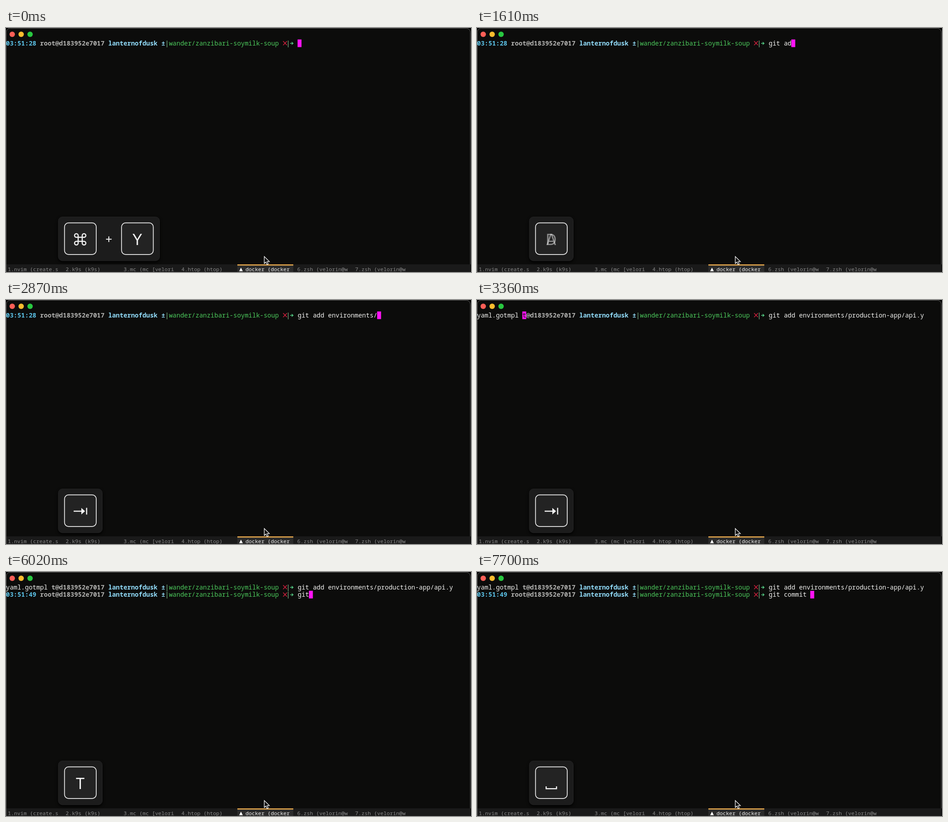
Animation, 1031 px wide and 543 px high, one loop 8000 ms. Source, as an HTML page:

```html
<!DOCTYPE html>
<html lang="en">
<head>
<meta charset="utf-8">
<title>Terminal session</title>
<style>
html, body { margin: 0; width: 100%; height: 100%; overflow: hidden; background: #0c0c0b; }
svg { display: block; width: 100vw; height: 100vh; }
text { white-space: pre; }
.mono { font: 14px "Noto Sans Mono", monospace; }
.tab { font: 11.667px "Noto Sans Mono", monospace; fill: #8b8b8b; }
.key { font: 33.5px Inter, sans-serif; fill: #f1f1f1; text-anchor: middle; }
.line { fill: none; stroke: #f1f1f1; stroke-width: 2.5; }
.panel { filter: drop-shadow(0 3px 3px #000); }
.b { font-weight: 700; }
</style>
</head>
<body>
<svg id="stage" viewBox="0 0 1031 543" preserveAspectRatio="none"></svg>
<script>
const NS = 'http://www.w3.org/2000/svg';
const stage = document.getElementById('stage');
const LOOP = 8000, STEP = 70, CELL = 8.4, INPUT = 77;

function add(parent, tag, attrs, text) {
  const el = document.createElementNS(NS, tag);
  for (const k in attrs) el.setAttribute(k, attrs[k]);
  if (text) el.textContent = text;
  parent.appendChild(el);
  return el;
}
const group = (parent, attrs) => add(parent, 'g', attrs || {});
const rect = (parent, x, y, width, height, fill, more) =>
  add(parent, 'rect', { x, y, width, height, fill, ...more });
const path = (parent, d, attrs) => add(parent, 'path', { d, ...attrs });
const rowY = row => 38.6 + row * 16.4;
const write = (parent, col, row, text, fill, bold) =>
  add(parent, 'text', { x: col * CELL, y: rowY(row), fill, class: bold ? 'mono b' : 'mono' }, text);
const show = (el, on) => el.setAttribute('opacity', +on);

// Terminal
rect(stage, 0, 0, 1031, 543, '#000');
rect(stage, 0.5, 0.5, 1029, 560, '#0c0c0b', { rx: 9, stroke: '#5c5c5b' });
['#ff5f57', '#febc2e', '#28c840'].forEach((fill, i) =>
  add(stage, 'circle', { cx: 13.8 + i * 19.8, cy: 14, r: 6, fill }));

function prompt(row, time) {
  const g = group(stage), y = row * 16.4;
  write(g, 0, row, time, '#5cc3e8', true);
  write(g, 9, row, 'root@d183952e7017', '#b2b2b0', true);
  write(g, 27, row, 'lanternofdusk', '#92dcfa', true);
  write(g, 41, row, '±', '#92dcfa', true);
  write(g, 42, row, '|', '#8fd6a0');
  write(g, 43, row, 'wander/zanzibari-soymilk-soup', '#4cc95c');
  path(g, `M614.4 ${29.3 + y}l8.6 9m0 -9l-8.6 9`, { stroke: '#d3213f', 'stroke-width': 1.5 });
  write(g, 74, row, '|', '#8fd6a0');
  path(g, `M630 ${34.2 + y}h6m-2.6 -2.9l3.2 2.9l-3.2 2.9`,
    { fill: 'none', stroke: '#55cf85', 'stroke-width': 1.4 });
  return g;
}
prompt(0, '03:51:28');
const wrap = group(stage);
rect(wrap, 1, 25, 12 * CELL - 1, 18, '#0c0c0b');
write(wrap, 0, 0, 'yaml.gotmpl', '#f2f2f0');
const second = prompt(1, '03:51:49');
const inputs = [0, 1].map(row => write(stage, INPUT, row, '', '#f2f2f0'));
const cursor = rect(stage, 0, 0, 8.7, 17, '#ff13f5');
const under = write(stage, 12, 0, 't', '#0c0c0b');

// Tab bar
rect(stage, 1, 526, 1029, 17, '#1a1a1a');
rect(stage, 513, 526, 124, 17, '#2b2b2b');
rect(stage, 513, 526, 124, 2.6, '#e5a74c');
['1.nvim (create.s', '2.k9s (k9s)', '3.mc (mc [velori', '4.htop (htop)', '',
  '6.zsh (velorin@w', '7.zsh (velorin@w'].forEach((name, i) =>
  add(stage, 'text', { x: 4 + i * 128.35, y: 541.3, class: 'tab' }, name));
path(stage, 'M517 541.2l4 -8l4 8z', { fill: '#fff' });
add(stage, 'text', { x: 531, y: 541.3, class: 'tab', style: 'fill:#f4f4f4' }, 'docker (docker');

// Key caps
function panel(width) {
  const g = group(stage);
  rect(g, 116, 420.5, width, 97.5, '#1c1c1c', { rx: 9, class: 'panel', stroke: '#252525' });
  return g;
}
const cap = (g, x) => rect(g, x, 433.7, 70.4, 70.4, '#232323',
  { rx: 9, stroke: '#ededed', 'stroke-width': 1.7 });

const combo = panel(224.5);
cap(combo, 129.7);
cap(combo, 256.2);
path(combo, 'M-4.5 -8.5a4 4 0 1 0 -4 4h17a4 4 0 1 0 -4 -4v17a4 4 0 1 0 4 -4h-17a4 4 0 1 0 4 4z',
  { class: 'line', transform: 'translate(164.5 470.3)' });
path(combo, 'M221.8 470h12.4M228 463.8v12.4', { class: 'line', style: 'stroke-width:2' });
add(combo, 'text', { x: 291, y: 482.6, class: 'key' }, 'Y');

const single = panel(97.5);
cap(single, 129.7);

const icons = {
  ' ': ['M153.3 477v5.2h23v-5.2', ''],
  tab: ['M150 470h20M178.8 462.5v15', 'M167 462.8l8.3 7.2l-8.3 7.2z'],
  enter: ['M168.5 457.3h3.5a6.2 6.2 0 0 1 0 12.8H158', 'M150.8 470.1l8.5 -7.3v14.6z']
};
const glyphs = {};
function glyph(name) {
  const g = group(single);
  if (icons[name]) {
    path(g, icons[name][0], { class: 'line' });
    path(g, icons[name][1], { fill: '#f1f1f1' });
  } else {
    add(g, 'text', { x: 164.6, y: 482.6, class: 'key' }, name);
  }
  glyphs[name] = g;
}

// Mouse pointer
path(stage, 'M572.6 508.5v15.6l3.7 -3.2l2.3 5.4l2.8 -1.2l-2.3 -5.3h4.9z',
  { fill: '#111', stroke: '#f4f4f4', 'stroke-width': 1.3 });

// Key presses: time, key, inserted text
const keys = [];
const press = (at, key, text = key.toLowerCase()) => keys.push({ at, key, text });
press(70, 'G'); press(420, 'I'); press(560, 'T'); press(840, ' ');
press(1400, 'A'); press(1610, 'D'); press(1960, 'D'); press(2030, ' ');
press(2380, 'tab', 'environments/');
press(3010, 'tab', 'production-app/');
press(3220, 'tab', 'api.y');
press(4340, 'enter', '');
press(5600, 'G'); press(5880, 'I'); press(5950, 'T'); press(6090, ' ');
press(6300, 'C'); press(6580, 'O'); press(6790, 'M'); press(6930, 'M');
press(7070, 'I'); press(7280, 'T'); press(7630, ' ');
new Set(keys.map(k => k.key)).forEach(glyph);

const WRAP = 3220, ENTER = 4340;

function draw(t) {
  const done = keys.filter(k => k.at <= t);
  const now = done[done.length - 1], before = done[done.length - 2];
  const wrapped = t >= WRAP, entered = t >= ENTER;
  const typed = row => done.filter(k => (k.at > ENTER) === !!row).map(k => k.text).join('');
  inputs.forEach((el, row) => { el.textContent = typed(row); });

  const onWrap = wrapped && !entered;
  const row = +entered;
  const col = onWrap ? 12 : INPUT + typed(row).length;
  cursor.setAttribute('x', col * CELL - 0.3);
  cursor.setAttribute('y', 25.5 + row * 16.3);
  show(wrap, wrapped);
  show(second, entered);
  show(under, onWrap);

  const mixing = now && t - now.at < STEP;
  show(combo, !now ? 1 : mixing && !before ? 0.5 : 0);
  show(single, !!now);
  for (const name in glyphs) {
    let level = now && now.key === name ? 1 : 0;
    if (mixing && before && before.key !== now.key) {
      if (level || before.key === name) level = 0.5;
    }
    show(glyphs[name], level);
  }
}

const start = performance.now();
function tick() {
  draw((performance.now() - start) % LOOP);
  requestAnimationFrame(tick);
}
draw(0);
requestAnimationFrame(tick);
</script>
</body>
</html>
```
